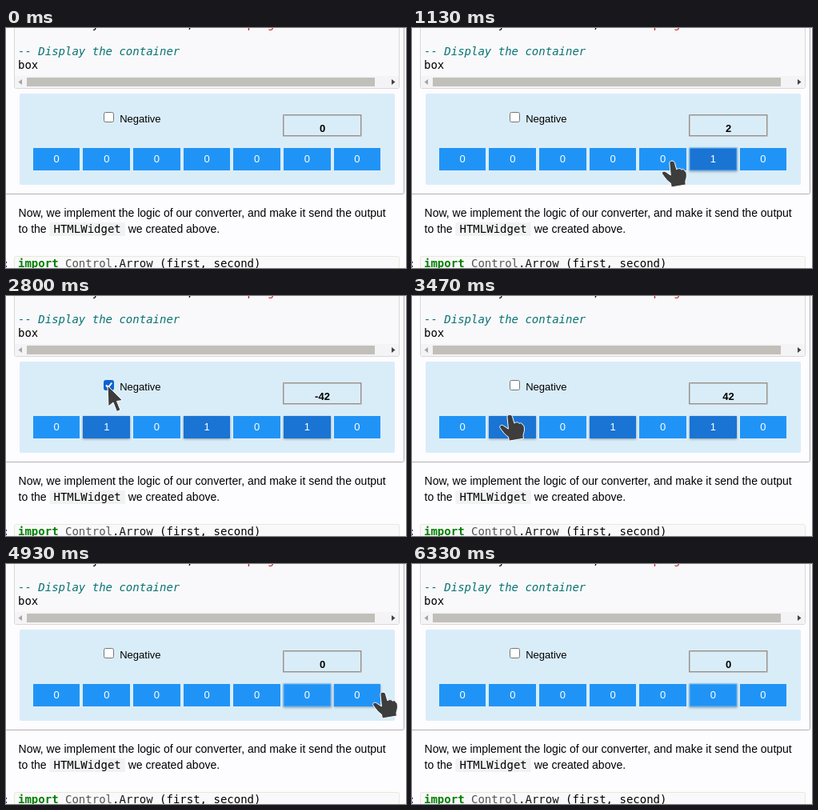
An HTML page that plays this animation: 500x300 px, repeating every 6390 ms.

```html
<!DOCTYPE html>
<html lang="en">
<head>
<meta charset="utf-8">
<title>Binary converter</title>
<style>
html, body { margin: 0; width: 100%; height: 100%; overflow: hidden; background: #fdfcff; }
svg { display: block; width: 500px; height: 300px; }
text { white-space: pre; font: 13px "Liberation Sans", Arial, sans-serif; fill: #000; }
.prose { font-size: 14px; }
.code { font: 14px "DejaVu Sans Mono", monospace; }
.note { font-style: italic; fill: #087474; }
.string { fill: #ba2121; }
.key { font-weight: bold; fill: #008000; }
.module { fill: #555; }
.name { fill: #111; }
.prompt { fill: #303f9f; }
.mid { text-anchor: middle; }
.cell { fill: #f9f8fa; stroke: #dad8d6; }
.cell.next { stroke: #eae9d8; }
.bit rect { fill: #2094f6; }
.bit text { fill: #fff; }
.bit.on rect { fill: #1974d4; }
.bit.on, .bit.hover { filter: drop-shadow(0 1px 1.5px rgba(0, 0, 0, .35)); }
.bit.focus rect { stroke: #64b5f6; }
#total { font-weight: bold; }
.pointer { fill: #3d3d3d; stroke: #fff; stroke-width: 1; stroke-linejoin: round; }
</style>
</head>
<body>
<svg viewBox="0 0 500 300">
  <rect width="500" height="300" fill="#fdfcff"/>
  <path d="M0 207.5H495.5Q497.5 207.5 497.5 205.5V0" fill="none" stroke="#b3b0b8"/>

  <rect class="cell" x="10.5" y="-20.5" width="481" height="96" rx="2"/>
  <text class="code" x="15" y="0">let widthBoy = toList box,<tspan class="string"> "in an program"</tspan></text>
  <text class="code note" x="15" y="34">-- Display the container</text>
  <text class="code" x="15" y="51">box</text>
  <rect x="11" y="60" width="480" height="15" fill="#f4f3f6"/>
  <rect x="26" y="62" width="435" height="11" fill="#c1bfb9"/>
  <path d="M20 64V71L15.5 67.5Z" fill="#a5a3a3"/>
  <path d="M482 64V71L486.5 67.5Z" fill="#454545"/>

  <rect x="17" y="82" width="469" height="114" rx="2" fill="#d9edf9"/>
  <rect id="tick" x="122.5" y="105.5" width="12" height="12" rx="2"/>
  <path id="check" d="M125 111.5L127.7 114.3L132.3 108.5" fill="none" stroke="#fff" stroke-width="2"/>
  <text x="142.2" y="118">Negative</text>
  <g fill="none">
    <path d="M346.5 136V108.5H445M347 134.5H443.5V109" stroke="#96928f"/>
    <path d="M347.5 134V109.5H443M346 135.5H444.5V108" stroke="#c4c0bf"/>
  </g>
  <text id="total" class="mid" x="395.5" y="130">0</text>
  <g id="bits"></g>

  <text class="prose" x="15.6" y="236">Now, we implement the logic of our converter, and make it send the output</text>
  <text class="prose" x="15.6" y="256">to the</text>
  <rect x="54.5" y="243" width="94.3" height="17" fill="#f1f2f2"/>
  <text class="code" x="59.5" y="256">HTMLWidget</text>
  <text class="prose" x="152.7" y="256">we created above.</text>

  <rect class="cell next" x="10.5" y="285.5" width="481" height="40" rx="2"/>
  <text class="code prompt" x="-4" y="299">:</text>
  <text class="code" x="15" y="299"><tspan class="key">import</tspan> <tspan class="module">Control</tspan><tspan class="name">.Arrow</tspan> (first, second)</text>

  <path id="hand" class="pointer" d="M-4 2C-4-1.5 1.5-1.8 2.5 1.5L5 10C7 8 10 8.3 11 10.2C13 9 15 10 15.3 11.8C17 12 17.5 14.5 17.5 18C17.5 21 16 23 16 25.5L16.5 29L-1.5 32L-2.5 27C-6 25-10 20-13 15.5C-14 12.5-11 11.3-8.5 13L-2.5 17Z"/>
  <path id="arrow" class="pointer" d="M0 0L1 26L7 21L11.5 32.5L16 30.5L11.5 19.5L18.5 18.5Z"/>
</svg>
<script>
const LOOP = 6390, STEP = 1000 / 15, HOVER_LAG = 100;
const NEG = -1;
const LEFT = 33.8, PITCH = 62.64, WIDTH = 58.64, TOP = 150, HEIGHT = 28;
const $ = id => document.getElementById(id);

// [ms, x, y] of the pointer tip
const path = [
  [330, 505, 205], [730, 380, 163], [930, 376, 163], [1130, 327, 167],
  [1330, 255, 164], [1530, 252, 163], [1800, 126, 162], [2000, 122, 160],
  [2130, 117, 149], [2400, 127, 113], [2530, 127, 112], [3200, 127, 112],
  [3530, 122, 158], [3800, 124, 161], [4060, 235, 161], [4130, 248, 161],
  [4330, 253, 162], [4530, 372, 162], [4730, 378, 162], [4930, 471, 161],
  [5060, 508, 160]
];
// [ms, bit toggled]
const clicks = [
  [860, 5], [1460, 3], [1930, 1], [2600, NEG],
  [3130, NEG], [3730, 1], [4260, 3], [4660, 5]
];

// Button edges sit on whole pixels, labels do not.
const bits = Array.from({ length: 7 }, (_, i) => {
  const x = LEFT + i * PITCH;
  const left = Math.round(x), right = Math.round(x + WIDTH);
  $("bits").insertAdjacentHTML("beforeend",
    `<g class="bit"><rect x="${left}" y="${TOP}" width="${right - left}" height="${HEIGHT}"/>` +
    `<text class="mid" x="${x + WIDTH / 2}" y="168">0</text></g>`);
  const group = $("bits").lastElementChild;
  return { left, right, group, label: group.querySelector("text") };
});

function pointerAt(t) {
  const k = path.findIndex(p => p[0] > t);
  if (k < 1) return null;
  const [t0, x0, y0] = path[k - 1], [t1, x1, y1] = path[k];
  const u = (t - t0) / (t1 - t0);
  return { x: x0 + (x1 - x0) * u, y: y0 + (y1 - y0) * u };
}

const inRow = p => p && p.y > TOP - 3 && p.y < TOP + HEIGHT;

function place(el, p, shown) {
  el.style.display = shown ? "" : "none";
  if (shown) el.setAttribute("transform", `translate(${p.x} ${p.y})`);
}

function render(t) {
  const on = Array(7).fill(false);
  let negative = false, focus = null;
  for (const [at, bit] of clicks) {
    if (at > t) break;
    if (bit === NEG) negative = !negative;
    else on[bit] = !on[bit];
    focus = bit;
  }

  const over = pointerAt(t - HOVER_LAG);
  bits.forEach(({ left, right, group, label }, i) => {
    const hover = inRow(over) && over.x >= left && over.x <= right;
    group.classList.toggle("on", on[i]);
    group.classList.toggle("hover", hover || focus === i);
    group.classList.toggle("focus", focus === i);
    label.textContent = +on[i];
  });

  const value = on.reduce((sum, b) => sum * 2 + b, 0);
  $("total").textContent = negative ? -value : value;
  $("tick").setAttribute("fill", negative ? "#0d62d0" : "#fff");
  $("tick").setAttribute("stroke", negative ? "#0d62d0" : "#767676");
  $("check").style.display = negative ? "" : "none";

  const p = pointerAt(t);
  const isHand = inRow(p) && p.x < 473;
  place($("hand"), p, p && isHand);
  place($("arrow"), p, p && !isHand);
}

const start = performance.now();
function tick() {
  const t = (performance.now() - start) % LOOP;
  const n = Math.min(95, Math.floor((t + 3.5) / STEP));
  render(n * STEP);
  requestAnimationFrame(tick);
}
tick();
</script>
</body>
</html>
```
